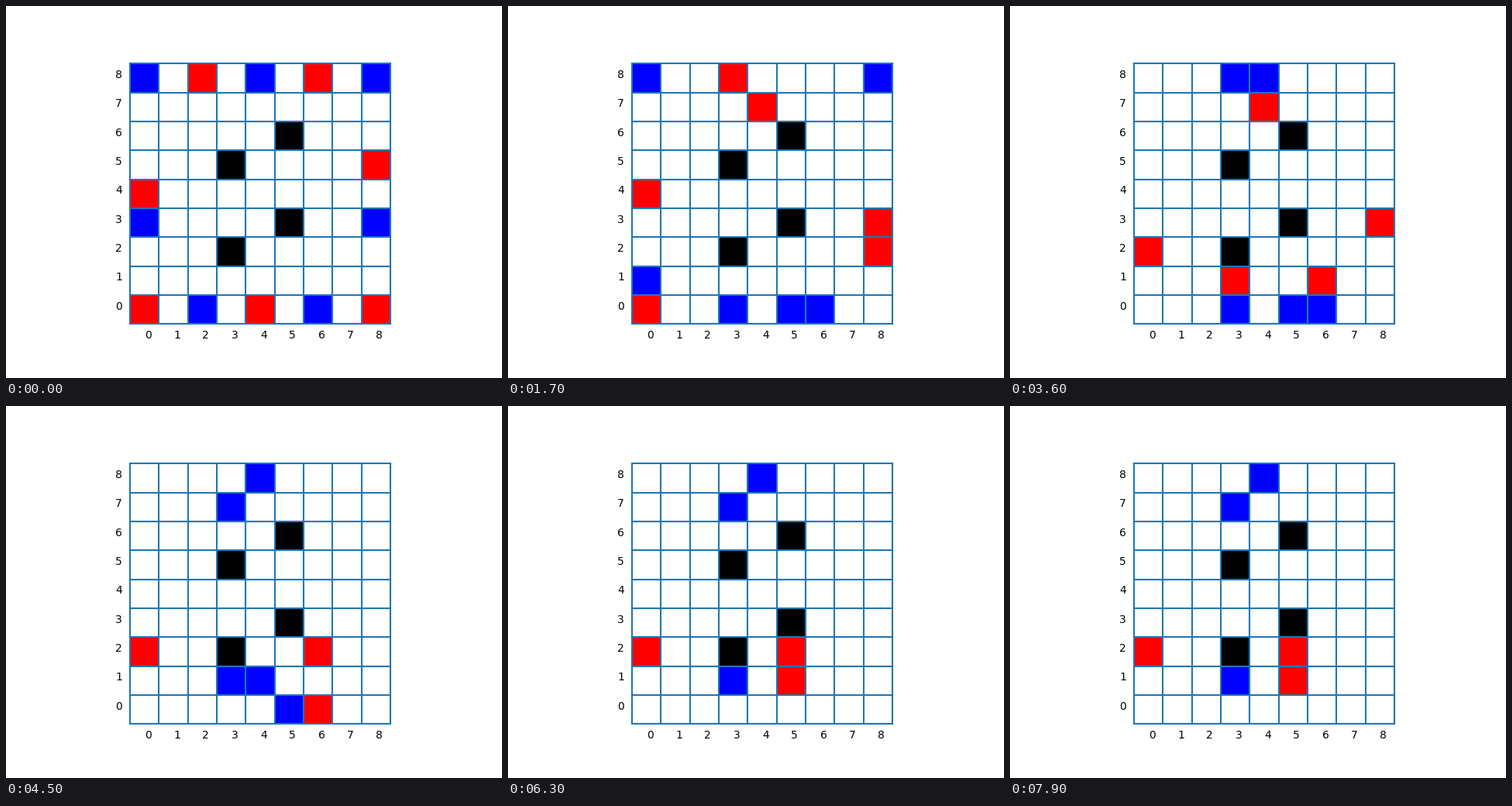
Write a matplotlib script that moves like this. It is 640x480 px and loops after 8 s.

```python
import matplotlib.pyplot as plt
from matplotlib.animation import FuncAnimation
from matplotlib.patches import Rectangle

SIZE = 9
FRAMES = 80
STEP_MS = 100

WALLS = "32 53 35 56"
BLUE = "08 48 88 03 83 20 60"
RED = "28 68 85 04 00 40 80"

# Each move is "from-to"; the sides take turns, blue first.
MOVES = """
20-30 80-81 60-50 85-84 83-73 84-83 73-72 81-82 72-71
28-38 71-61 68-67 61-60 67-57 03-02 57-47 02-01 00-10
88-78 10-11 08-18 04-03 18-28 03-02
78-68 11-21 28-27 38-48 27-28 21-31 28-38 82-72 68-58 72-62 58-48 62-61
38-37 83-73 50-40 73-72 40-41 72-62 60-50 61-60 30-31 60-61 50-51 62-52
31-30 61-51 30-31 52-42 31-30 42-52 30-31
""".split()
LOOP = "52-42 31-30 42-52 30-31".split()


def cell(code):
    return int(code[0]), int(code[1])


def cells(codes):
    return [cell(c) for c in codes.split()]


def neighbours(x, y):
    return [(x + 1, y), (x - 1, y), (x, y + 1), (x, y - 1)]


def play(board, move):
    """Move one piece; opponents touched by two enemies leave the board."""
    src, dst = map(cell, move.split("-"))
    board = dict(board)
    side = board.pop(src)
    board[dst] = side
    lost = [p for p, s in board.items() if s != side
            and sum(board.get(n) == side for n in neighbours(*p)) >= 2]
    for p in lost:
        del board[p]
    return board


def history():
    board = {c: "blue" for c in cells(BLUE)}
    board.update({c: "red" for c in cells(RED)})
    boards = [board]
    for i in range(FRAMES - 1):
        late = i - len(MOVES)
        move = MOVES[i] if late < 0 else LOOP[late % len(LOOP)]
        boards.append(play(boards[-1], move))
    return boards


fig = plt.figure(figsize=(6.4, 4.8), dpi=100, facecolor="white")
ax = fig.add_subplot()
pad = 0.05 * SIZE
ax.set(xlim=(-pad, SIZE + pad), ylim=(-pad, SIZE + pad), aspect="equal")
ax.axis("off")

for i in range(SIZE + 1):
    ax.plot([0, SIZE], [i, i], color="C0", lw=1.5)
    ax.plot([i, i], [0, SIZE], color="C0", lw=1.5)
for i in range(SIZE):
    ax.text(i + 0.5, -0.5, str(i), fontsize=10, family="DejaVu Sans")
    ax.text(-0.5, i + 0.5, str(i), fontsize=10, family="DejaVu Sans")
for c in cells(WALLS):
    ax.add_patch(Rectangle(c, 1, 1, fc="black", lw=0))

boards = history()
tiles = [ax.add_patch(Rectangle((0, 0), 1, 1, lw=0)) for _ in boards[0]]


def draw(frame):
    pieces = list(boards[frame].items())
    for i, tile in enumerate(tiles):
        tile.set_visible(i < len(pieces))
        if i < len(pieces):
            pos, side = pieces[i]
            tile.set_xy(pos)
            tile.set_facecolor(side)
    return tiles


anim = FuncAnimation(fig, draw, frames=FRAMES, interval=STEP_MS,
                     repeat=True, repeat_delay=0)
plt.show()
```
